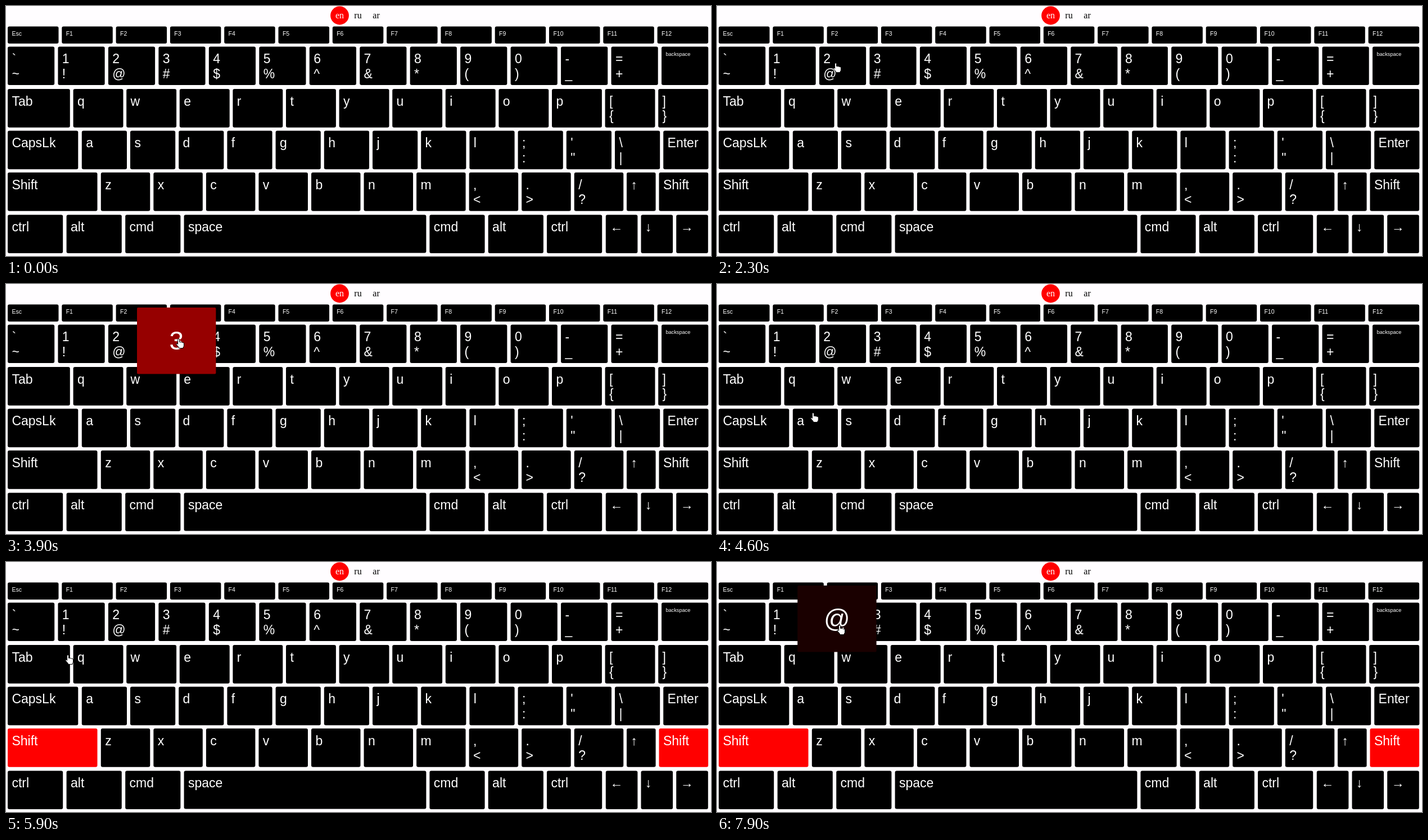
These frames come from a looping animation (1254 by 446 pixels, 8 s). An HTML page:

```html
<!DOCTYPE html>
<html lang="en">
<head>
<meta charset="utf-8">
<title>Virtual keyboard</title>
<style>
html, body { margin: 0; width: 100%; height: 100%; overflow: hidden; background: #fffdff; }
svg { display: block; width: 1254px; height: 446px; }
text { font-family: "Liberation Sans", Arial, sans-serif; fill: #fff; white-space: pre; }
.lang { font: 16px "Liberation Serif", "Times New Roman", serif; text-anchor: middle; }
</style>
</head>
<body>
<svg id="stage" viewBox="0 0 1254 446"></svg>
<script>
const LOOP = 8000, STEP = 100, RED = "#f00";
const stage = document.getElementById("stage");

function add(tag, attrs, label, parent = stage) {
  const el = document.createElementNS("http://www.w3.org/2000/svg", tag);
  for (const k in attrs) el.setAttribute(k, attrs[k]);
  if (label) el.textContent = label;
  parent.appendChild(el);
  return el;
}

function key(x, y, w, h, label, size = 23, base = 29.5) {
  const box = add("rect", { x, y, width: w, height: h, rx: 3, fill: "#000" });
  label.split(" ").forEach((s, i) =>
    add("text", { x: x + 7.4, y: y + base + i * 26.8, "font-size": size }, s));
  return box;
}

// A run of equal keys; "1 !" puts the second symbol on a second line
function run(x, y, step, w, labels) {
  labels.forEach((s, i) => key(x + i * step, y, w, 68.7, s));
}

// Language switch
add("circle", { cx: 593.5, cy: 17, r: 16.4, fill: RED });
["en", "ru", "ar"].forEach((s, i) =>
  add("text", { class: "lang", x: 593.5 + i * 32.5, y: 21.8, style: i ? "fill:#000" : "" }, s));

// Keyboard rows
for (let i = 0; i < 13; i++)
  key(3 + i * 96.3, 36.4, 90.5, 30.5, i ? "F" + i : "Esc", 10.5, 17);

run(3, 72.4, 89.46, 83.2,
  "` ~,1 !,2 @,3 #,4 $,5 %,6 ^,7 &,8 *,9 (,0 ),- _,= +".split(","));
key(1166, 72.4, 83.2, 68.7, "backspace", 9.2, 16.5);

key(3, 148, 110.8, 68.7, "Tab");
run(119.6, 148, 94.6, 88.9, [..."qwertyuiop", "[ {", "] }"]);

key(3, 222.6, 125.3, 68.7, "CapsLk");
run(134.8, 222.6, 86.2, 80.2, [..."asdfghjkl", "; :", "' \"", "\\ |", "Enter"]);

const leftShift = key(3, 297, 159.5, 68.7, "Shift");
run(168.8, 297, 93.55, 87.5, [..."zxcvbnm", ", <", ". >", "/ ?"]);
key(1104, 297, 51.6, 68.7, "↑");
const rightShift = key(1161.5, 297, 87.6, 68.7, "Shift");

run(3, 372.4, 104.6, 98.2, ["ctrl", "alt", "cmd"]);
key(316.6, 372.4, 430.8, 68, "space");
run(753.4, 372.4, 104.3, 98.2, ["cmd", "alt", "ctrl"]);
run(1066.8, 372.4, 62.7, 56.6, ["←", "↓", "→"]);

// Enlarged pressed key
const popup = add("g", {});
const popBox = add("rect", { height: 118.6, rx: 2 }, "", popup);
const popText = add("text", { "font-size": 46, "text-anchor": "middle" }, "", popup);

// Pointers
const line = { fill: "#fff", stroke: "#000", "stroke-width": 1, "stroke-linejoin": "round" };
const arrow = add("path", { ...line, d: "M.5 .5V14L3.7 11 6 16.2 8.2 15.2 6 10.2H10.3Z" });
const hand = add("path", { ...line,
  d: "M3.6 10.6V2.2a1.5 1.5 0 0 1 3 0V6.6q1.4-.9 2.5.3 1.5-.7 2.6.5 2.6-.5 2.8 1.6V13q0 1.8-1.4 3V17.6H5.4V16L1 11q-.6-2.2 1.2-1.8Z" });

// Presses: visible from, until, colour start, left, top, width, label
const presses = [
  [1400, 2300, 1360, 53.6, 42, 140.4, "1"],
  [2500, 3400, 2460, 143.2, 42, 140.4, "2"],
  [3600, 4500, 3560, 233, 42, 140.4, "3"],
  [5000, 5900, 4971, -10, 266.2, 191, "Shift"],
  [6500, 7500, 6436, 53.6, 42, 140.4, "!"],
  [7900, 8000, 7796, 143.2, 42, 140.4, "@"]
];

// Pointer stops: time, x, y
const stops = [
  [600, 95, 20], [700, 98, 52], [800, 104, 84], [900, 109, 98],
  [1900, 109, 98], [2200, 206, 101],
  [2900, 206, 101], [3300, 302, 97],
  [4300, 302, 97], [4800, 75, 317],
  [5700, 75, 317], [5800, 90, 231], [5900, 105, 165], [6200, 126, 107],
  [7000, 126, 107], [7300, 213, 112], [8000, 213, 112]
];

// CSS "ease": cubic-bezier(.25, .1, .25, 1)
function ease(p) {
  if (p <= 0 || p >= 1) return p <= 0 ? 0 : 1;
  const bez = (a, b, u) => 3 * a * u * (1 - u) ** 2 + 3 * b * u * u * (1 - u) + u ** 3;
  let lo = 0, hi = 1;
  for (let i = 0; i < 24; i++) {
    const mid = (lo + hi) / 2;
    if (bez(.25, .25, mid) < p) lo = mid; else hi = mid;
  }
  return bez(.1, 1, lo);
}

function show(el, on) { el.setAttribute("display", on ? "inline" : "none"); }

function pointerAt(t) {
  const i = Math.max(1, stops.findIndex(s => s[0] >= t));
  const [t0, x0, y0] = stops[i - 1], [t1, x1, y1] = stops[i];
  const p = (t - t0) / (t1 - t0);
  return [x0 + (x1 - x0) * p, y0 + (y1 - y0) * p];
}

function draw(t) {
  const press = presses.find(p => t >= p[0] && t < p[1]);
  show(popup, press);
  if (press) {
    const [, , start, x, y, w, label] = press;
    popBox.setAttribute("x", x);
    popBox.setAttribute("y", y);
    popBox.setAttribute("width", w);
    popBox.setAttribute("fill", `rgb(${Math.round(255 * ease((t - start) / 1000))},0,0)`);
    popText.setAttribute("x", label === "Shift" ? 53.3 : x + w / 2);
    popText.setAttribute("y", y + 75);
    popText.textContent = label;
  }
  rightShift.setAttribute("fill", t >= 5000 ? RED : "#000");
  leftShift.setAttribute("fill", t >= 5900 ? RED : "#000");

  const visible = t >= 600;
  const [x, y] = visible ? pointerAt(t) : [0, 0];
  const onKey = y > 32;
  show(hand, visible && onKey);
  show(arrow, visible && !onKey);
  (onKey ? hand : arrow).setAttribute("transform", `translate(${x.toFixed(1)} ${y.toFixed(1)})`);
}

const began = performance.now();
function tick() {
  const t = Math.max(0, performance.now() - began) % LOOP;
  draw(Math.floor(t / STEP) * STEP);
  requestAnimationFrame(tick);
}
tick();
</script>
</body>
</html>
```
